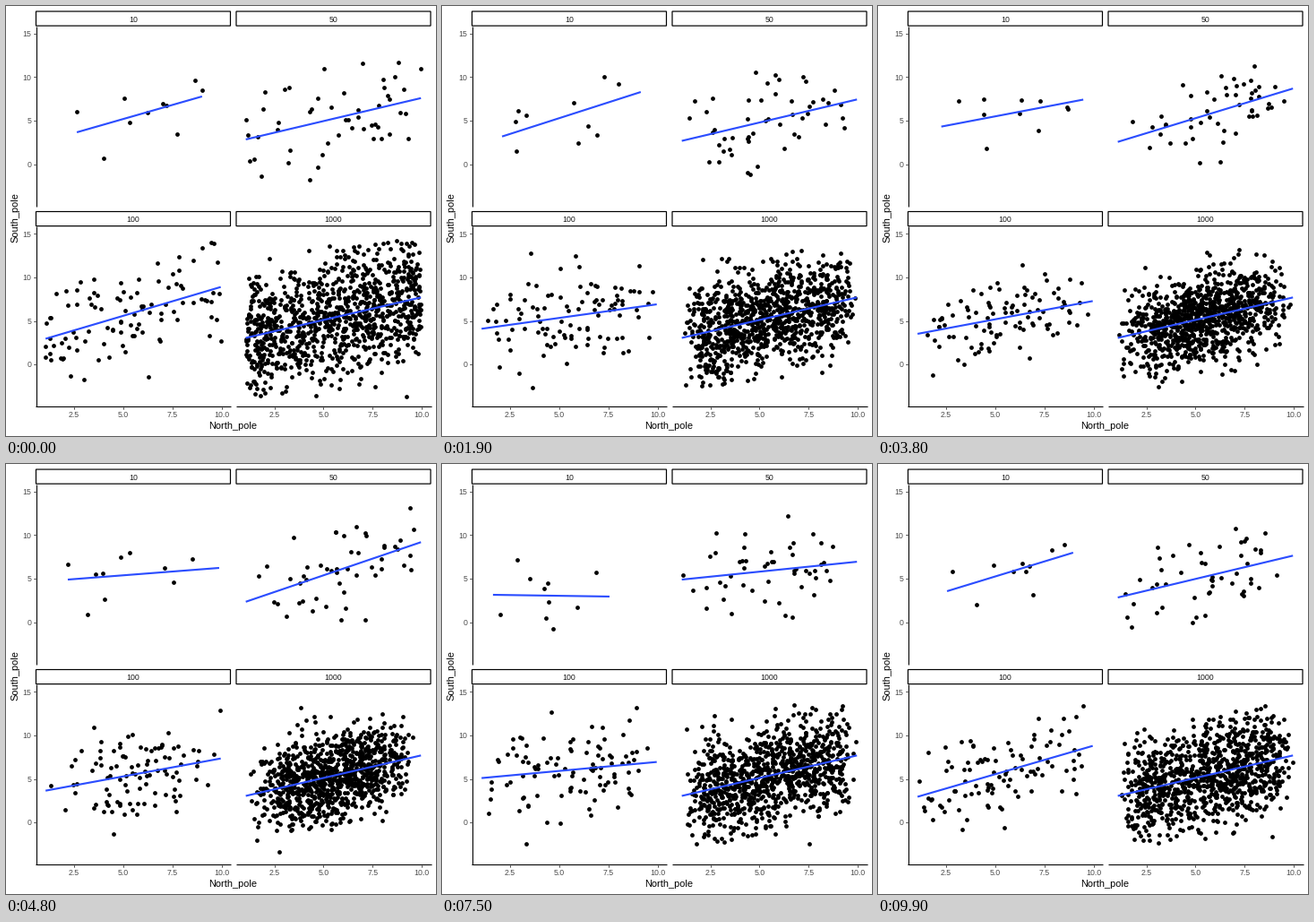
Recreate the animation shown at these times as a matplotlib script. Size 480x480 px, loop 10000 ms.

```python
import matplotlib.pyplot as plt
import numpy as np
from matplotlib.animation import FuncAnimation
from matplotlib.patches import Rectangle

SIZE, PT = 480, 0.72              # stage in pixels, points per pixel
STATES, STEPS = 10, 10            # simulated samples, frames per sample
DX, DY = 223.5, 223.5             # distance between panels
LOW, HIGH = -3.7, 14.6            # range of South_pole
SPREAD = 3.4                      # scatter around the fitted line
BLUE, TICK, LABEL = "#2B4DFF", "#333333", "#4D4D4D"

rng = np.random.default_rng(14)
plt.rcParams["font.family"] = "Liberation Sans"

# South_pole at the left and right end of each sample's fitted line.
FITS = {
    10: [(3.67, 7.79), (1.61, 8.3), (3.5, 8.3), (4.37, 9.08), (4.3, 6.6),
         (5.2, 6.06), (6.15, 4.02), (3.0, 2.7), (3.9, 4.2), (3.05, 9.02)],
    50: [(2.85, 7.6), (4.1, 7.15), (2.4, 7.5), (1.8, 8.1), (2.95, 9.0),
         (2.05, 9.3), (1.6, 7.95), (4.8, 7.0), (5.4, 6.7), (2.8, 7.9)],
    100: [(2.95, 8.9), (3.35, 8.2), (4.25, 6.65), (3.65, 6.35), (3.45, 7.75),
          (3.75, 7.15), (4.58, 6.85), (5.2, 7.05), (4.6, 6.45), (2.95, 8.3)],
    1000: [(3.05, 7.7)] * STATES,
}

# North_pole range: varies in the smallest samples, nearly full otherwise.
SMALL_RANGES = [(2.64, 9.0), (3.05, 9.83), (1.9, 9.0), (1.57, 8.67),
                (2.6, 9.87), (1.97, 9.87), (2.08, 9.26), (1.6, 7.3),
                (1.78, 8.8), (2.09, 8.73)]
FULL_RANGE = (1.05, 9.95)


def sx(v):
    return 21.1 + 21.97 * v


def sy(v):
    return 176.6 - 9.71 * v


def sample(n, x_range, fit):
    """Random points whose least-squares line has the given ends."""
    u = rng.random(n)
    u = (u - u.min()) / np.ptp(u)
    base = np.interp(u, (0, 1), fit)
    y = base + rng.normal(0, SPREAD, n)
    y = HIGH - abs(HIGH - (LOW + abs(y - LOW)))
    rest = y - base
    rest -= np.polyval(np.polyfit(u, rest, 1), u)
    return np.column_stack([np.interp(u, (0, 1), x_range), base + rest])


def to_stage(points, dx, dy):
    return np.stack([sx(points[..., 0]) + dx, sy(points[..., 1]) + dy], -1)


def build(n, dx, dy):
    ranges = SMALL_RANGES if n == 10 else [FULL_RANGE] * STATES
    dots = np.array([sample(n, r, f) for r, f in zip(ranges, FITS[n])])
    lines = np.array([list(zip(r, f)) for r, f in zip(ranges, FITS[n])])
    return to_stage(dots, dx, dy), to_stage(lines, dx, dy)


fig = plt.figure(figsize=(SIZE / 100, SIZE / 100), dpi=100, facecolor="white")
ax = fig.add_axes([0, 0, 1, 1])
ax.set_xlim(0, SIZE)
ax.set_ylim(SIZE, 0)
ax.axis("off")


def rule(x, y, color="black"):
    ax.plot(x, y, color=color, lw=1.07 * PT, solid_capstyle="butt")


def text(x, y, s, size=8.8, color=LABEL, **kw):
    ax.text(x, y, s, fontsize=size * PT, color=color,
            **{"ha": "center", "va": "baseline", **kw})


def frame_panel(n, dx, dy):
    ax.add_patch(Rectangle((33.5 + dx, 6 + dy), 217, 16.1, fill=False,
                           ec="black", lw=1.2 * PT, snap=False))
    text(142 + dx, 17.6 + dy, str(n), color="#1A1A1A")
    if dx == 0:
        rule([33.5, 33.5], [22.6 + dy, 223.5 + dy])
        for v in (0, 5, 10, 15):
            y = sy(v) + dy
            rule([30.5, 33], [y, y], TICK)
            text(28.6, y + 3.1, str(v), ha="right")
    if dy:
        rule([33 + dx, 251 + dx], [447.1, 447.1])
        for v in (2.5, 5.0, 7.5, 10.0):
            x = sx(v) + dx
            rule([x, x], [447.5, 450], TICK)
            text(x, 458.7, f"{v:.1f}")


panels = []
for n, dx, dy in ((10, 0, 0), (50, DX, 0), (100, 0, DY), (1000, DX, DY)):
    frame_panel(n, dx, dy)
    dots, = ax.plot([], [], "o", color="black", ms=4.8 * PT, mew=0, zorder=3)
    fit, = ax.plot([], [], color=BLUE, lw=2.13 * PT,
                   solid_capstyle="butt", zorder=4)
    panels.append((dots, fit, *build(n, dx, dy)))

text(253.5, 472, "North_pole", 11, "black")
text(10, 235.8, "South_pole", 11, "black", rotation=90, va="center")


def progress(i):
    """Current sample and the part of the way to the next one."""
    k, r = divmod(i, STEPS)
    hold = 3 if k == 0 else 4
    return k, max(0, r - hold) / (STEPS - hold)


def draw(i):
    k, part = progress(i)
    following = (k + 1) % STATES
    for dots, fit, points, lines in panels:
        for artist, states in ((dots, points), (fit, lines)):
            pos = (1 - part) * states[k] + part * states[following]
            artist.set_data(pos[:, 0], pos[:, 1])
    return [artist for panel in panels for artist in panel[:2]]


anim = FuncAnimation(fig, draw, frames=STATES * STEPS, interval=100,
                     init_func=lambda: draw(0), repeat=True, repeat_delay=0)
plt.show()
```
